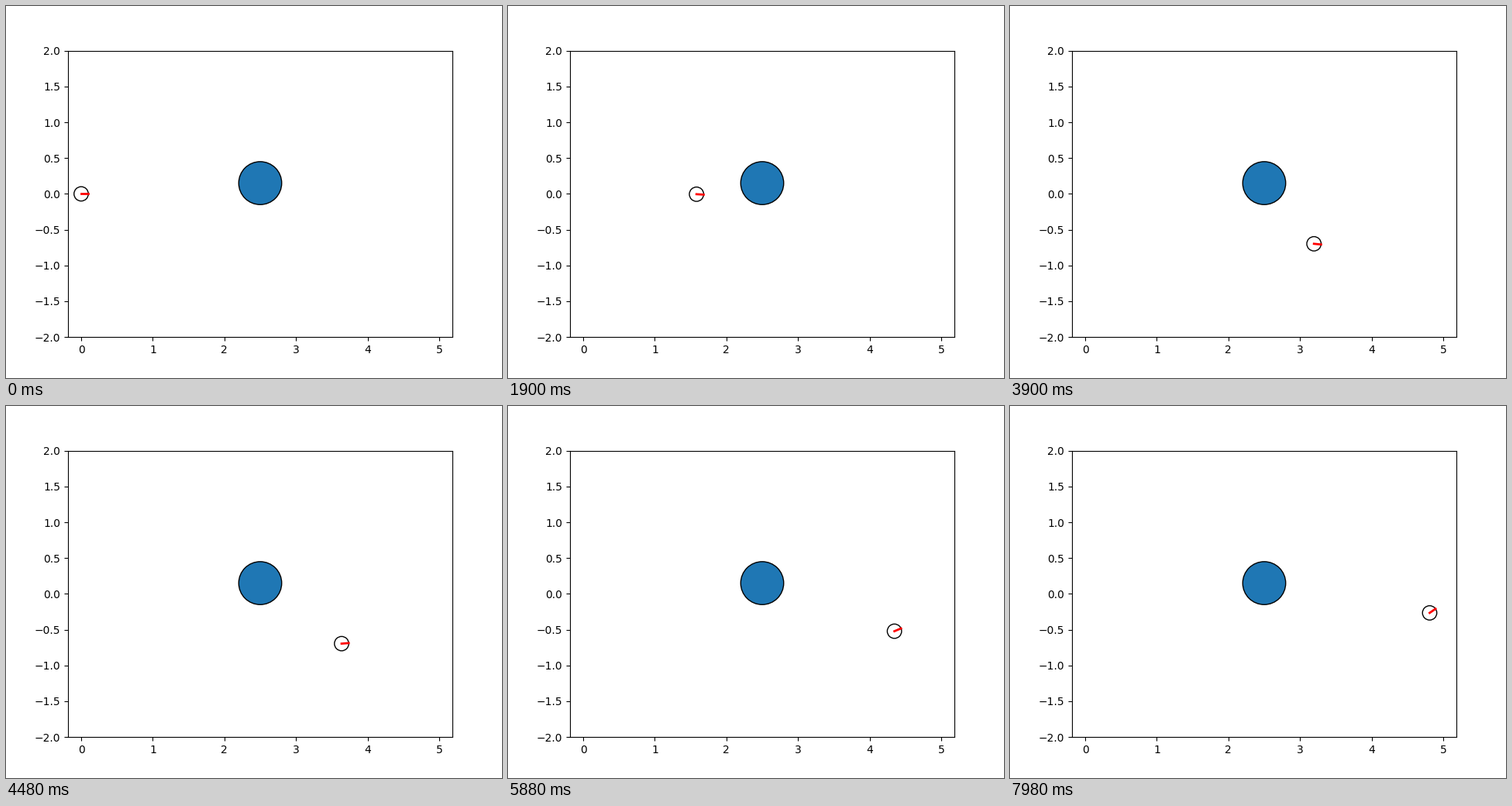
A matplotlib script that plays this animation: 640 px wide and 480 px high, repeating every 8 s.

```python
import numpy as np
import matplotlib.pyplot as plt
from matplotlib.animation import FuncAnimation

FRAMES, STEP = 400, 20
DT = STEP / 1000
RADIUS = 0.1

# Key points of the track: x, y, slope
TRACK = np.array([
    (0.00, 0.000, 0.00),
    (1.35, 0.000, 0.00),
    (2.083, -0.153, -0.63),
    (2.46, -0.429, -0.68),
    (3.362, -0.705, 0.00),
    (3.996, -0.638, 0.25),
    (4.81, -0.266, 0.69),
])


def track(x):
    """Height and slope of the smooth track at x."""
    k = np.clip(np.searchsorted(TRACK[:, 0], x, side="right") - 1, 0, len(TRACK) - 2)
    (x0, y0, s0), (x1, y1, s1) = TRACK[k], TRACK[k + 1]
    h = x1 - x0
    u = (x - x0) / h
    b = 3 * (y1 - y0) - h * (2 * s0 + s1)
    c = 2 * (y0 - y1) + h * (s0 + s1)
    y = y0 + u * (h * s0 + u * (b + u * c))
    return y, s0 + u * (2 * b + 3 * u * c) / h


def speed(t):
    """Quick start, steady cruise, then exponential slowing near the goal."""
    start = 1 - np.exp(-t / 0.135)
    slowing = (1 + np.exp(8 * 0.43 * (t - 3.858))) ** (-1 / 8)
    return 0.907 * start * slowing


def drive():
    """Robot x in every frame; it stands still for the first step."""
    xs = [0.0, 0.0]
    for i in range(FRAMES - 2):
        slope = track(xs[-1])[1]
        xs.append(xs[-1] + speed((i + 0.5) * DT) * DT / np.hypot(1, slope))
    return xs


XS = drive()

fig, ax = plt.subplots(figsize=(6.4, 4.8), dpi=100)
ax.set_xlim(2.5 - 2.684, 2.5 + 2.684)
ax.set_ylim(-2, 2)

ax.add_patch(plt.Circle((2.5, 0.15), 0.3, fc="C0", ec="black"))
robot = ax.add_patch(plt.Circle((0, 0), RADIUS, fill=False, ec="black"))
pointer, = ax.plot([0, RADIUS], [0, 0], color="red", lw=2)


def update(i):
    x = XS[i]
    y, slope = track(x)
    heading = np.arctan(slope)
    robot.center = x, y
    pointer.set_data([x, x + RADIUS * np.cos(heading)],
                     [y, y + RADIUS * np.sin(heading)])
    return robot, pointer


anim = FuncAnimation(fig, update, frames=FRAMES, interval=STEP,
                     init_func=lambda: update(0), repeat=True, repeat_delay=0)
plt.show()
```
